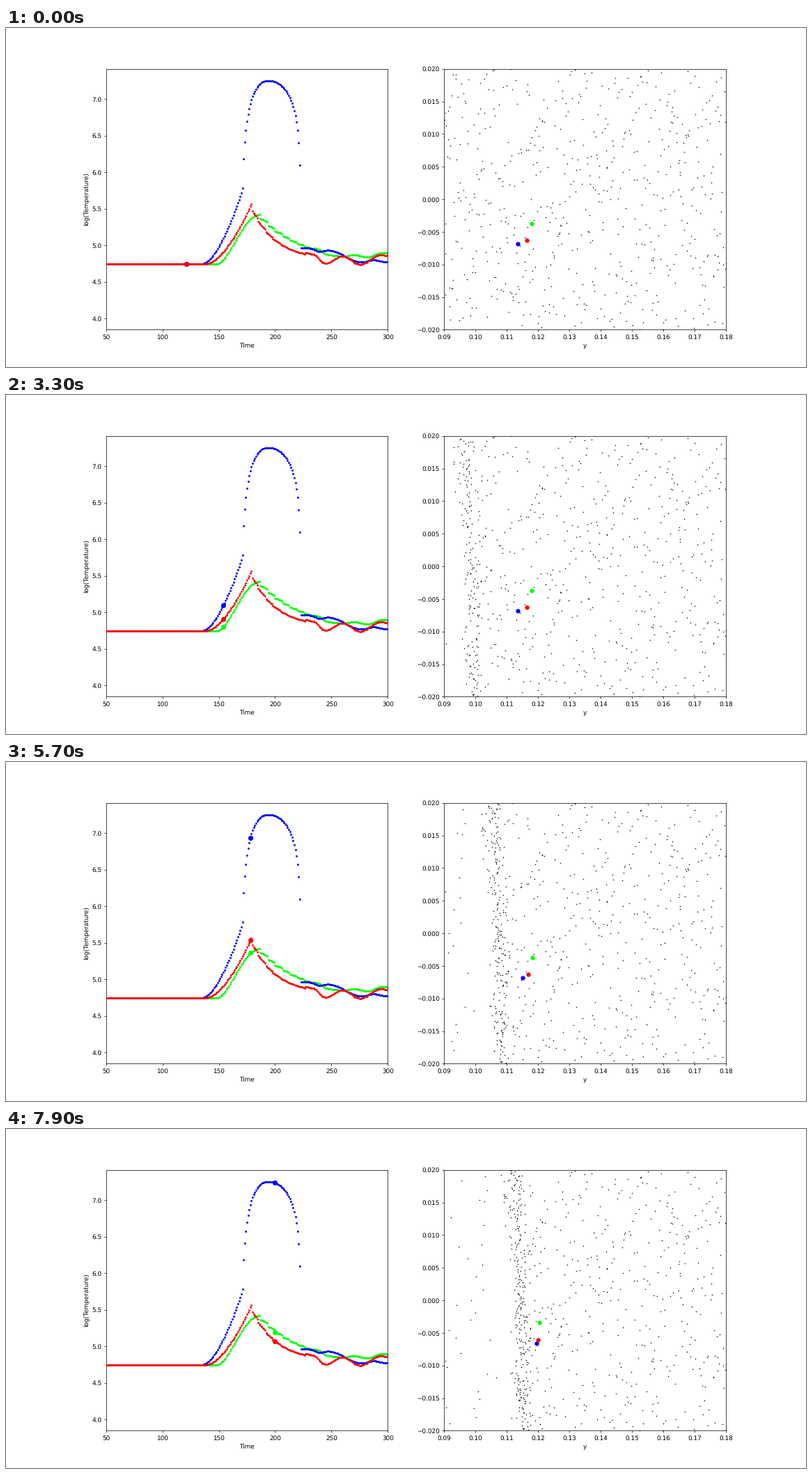
These frames come from a looping animation (1149x487 px, 8000 ms). A matplotlib script:

```python
import numpy as np
import matplotlib.pyplot as plt
from matplotlib.animation import FuncAnimation

DPI = 64
START, STEPS = 121, 80
END = START + STEPS - 1
BASE = 4.75
BLUE, RED, GREEN = "#0000ff", "#ff0000", "#00ff00"

plt.rcParams.update({"font.family": "DejaVu Sans", "text.hinting": "none"})
times = np.arange(50, 301)


def rise(start, scale, power):
    """Flat baseline that climbs as a power of time after start."""
    return BASE + scale * np.maximum(times - start, 0) ** power


def decay(start, floor, height, tau, period):
    """Exponential cooling broken into small steps."""
    age = times - start
    steps = .045 * ((age / period) % 1 - .5)
    return floor + (height + steps) * np.exp(-age / tau)


def dome(radius, power, scale):
    """Logarithm of a rounded bump around its peak."""
    u = np.minimum(np.abs(times - 194) / radius, .999)
    return 7.253 + scale * np.log10(1 - u ** power)


def eased(*keys):
    """Cosine easing from one key point to the next."""
    t, v = np.array(keys).T
    i = np.clip(np.searchsorted(t, times, "right") - 1, 0, len(t) - 2)
    u = np.clip((times - t[i]) / (t[i + 1] - t[i]), 0, 1)
    return v[i] + (v[i + 1] - v[i]) * (1 - np.cos(np.pi * u)) / 2


def stages(first, *later):
    """Join curves, each taking over at its own time."""
    out = first
    for begin, values in later:
        out = np.where(times >= begin, values, out)
    return out


green_climb = np.clip((times - 149) / 37, 0, 1)
green_temp = stages(
    BASE + .67 * np.sin(np.pi / 2 * green_climb) ** 1.6,
    (187, decay(187, 4.77, .62, 38, 6.5)),
    (235, eased((235, 4.96), (249, 4.865), (260, 4.85), (270, 4.87),
                (282, 4.84), (294, 4.897), (300, 4.893))))

blue_temp = stages(
    rise(136, .0033, 1.61),
    (171, dome(24.1, 2.3, 1.48)),
    (194, dome(28.9, 2, .95)),
    (223, eased((223, 4.96), (230, 4.96), (240, 4.917), (247, 4.932),
                (277, 4.77), (287, 4.80), (300, 4.773))))

red_temp = stages(
    rise(139, .00186, 1.65),
    (180, decay(178, 4.80, .74, 22, 6.6)),
    (227, eased((227, 4.90), (233, 4.88), (244.5, 4.755), (260, 4.855),
                (275, 4.74), (294, 4.87), (300, 4.855))))

# Evenly scattered particles, plus stragglers trailing the wall
rng = np.random.default_rng(5)
COUNT, LATE = 700, 34


def scatter(low, high, n):
    """Random values, one in each of n equal slots, in random order."""
    return low + (high - low) * (rng.permutation(n) + rng.random(n)) / n


rest_x = np.r_[scatter(.072, .18, COUNT), np.full(LATE, .05)]
rest_y = np.r_[scatter(-.02, .02, COUNT), scatter(-.02, .02, LATE)]
bend = np.clip((rest_y - .001) / .019, 0, 1)
lag = rng.normal(0, 1, rest_x.size) * (.0014 + .0008 * bend) - .003 * bend
lag[-LATE:] -= rng.uniform(.007, .025, LATE)


def particles(t):
    """Sweep the particles up in front of a slowing, slightly bent wall."""
    s = t - START
    wall = .084 + .00047 * s - 1.07e-6 * s ** 2 + lag
    width = .003
    return wall + width * np.logaddexp(0, (rest_x - wall) / width)


def drift(t, power):
    """Share of a tracer's push completed at time t."""
    return max((t - 162) / (END - 162), 0) ** power


fig, (left, right) = plt.subplots(1, 2, figsize=(1149 / DPI, 487 / DPI),
                                  dpi=DPI)
fig.subplots_adjust(left=.125, right=.9, bottom=.11, top=.8792, wspace=.2)

left.set(xlim=(50, 300), ylim=(3.847, 7.412),
         xlabel="Time", ylabel="log(Temperature)")
right.set(xlim=(.09, .18), ylim=(-.02, .02), xlabel="y")

dust, = right.plot([], [], "o", color="black", ms=1.7, mew=0)

# Colour, curve, rest position, push, push power
specs = [(GREEN, green_temp, (.1180, -.00377), (.0023, .0004), 2.6),
         (BLUE, blue_temp, (.1136, -.00687), (.0059, .0003), 1.7),
         (RED, red_temp, (.1163, -.00627), (.0037, .0002), 2.1)]
tracers = []
for order, (color, temp, rest, push, power) in enumerate(specs):
    left.plot(times, temp, ".", color=color, ms=4.5, zorder=2 + order)
    marker, = left.plot([], [], "o", color=color, ms=7, zorder=6 + order)
    spot, = right.plot([], [], "o", color=color, ms=6, zorder=6 + order)
    tracers.append((temp, rest, push, power, marker, spot))


def update(step):
    t = START + step
    dust.set_data(particles(t), rest_y)
    artists = [dust]
    for temp, rest, push, power, marker, spot in tracers:
        marker.set_data([t], [temp[t - times[0]]])
        share = drift(t, power)
        spot.set_data([rest[0] + push[0] * share], [rest[1] + push[1] * share])
        artists += [marker, spot]
    return artists


anim = FuncAnimation(fig, update, frames=STEPS, interval=100,
                     repeat=True, repeat_delay=0, blit=False)
plt.show()
```
